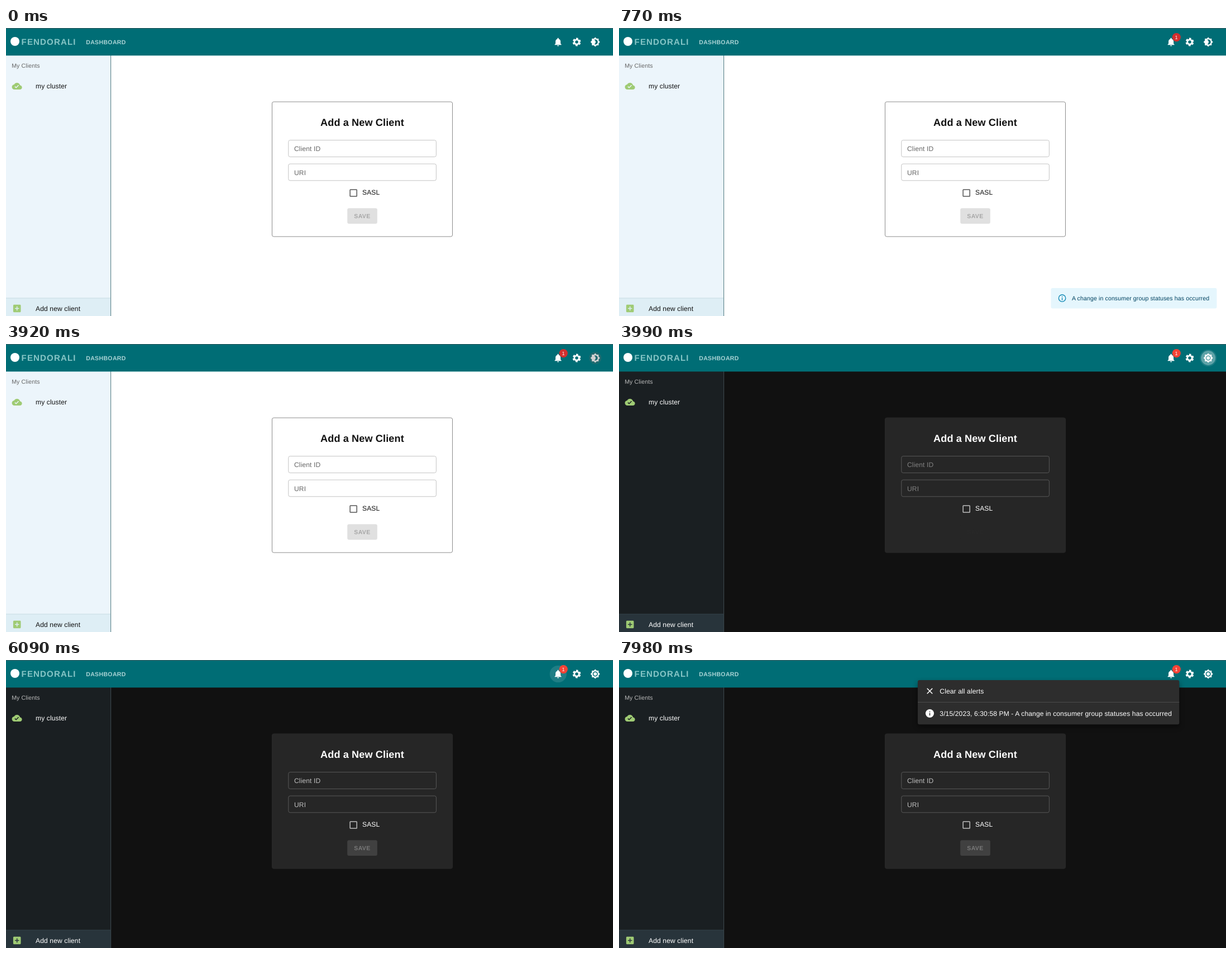
Write an HTML page that moves like this. It is 1087 by 515 pixels and loops after 8 s.

```html
<!DOCTYPE html>
<html lang="en">
<head>
<meta charset="utf-8">
<title>Client dashboard</title>
<style>
  html, body { margin: 0; width: 100%; height: 100%; overflow: hidden; }
  svg { display: block; width: 1087px; height: 515px;
    font: 12.08px "Liberation Sans", Arial, sans-serif; letter-spacing: .113px;
    text-rendering: geometricPrecision;
    --page: #fff; --drawer: #ecf5fb; --edge: #668a91; --item: #deeef5; --rule: #c9dde3;
    --card: #fff; --frame: #8c8c8c; --field: #c4c4c4; --text: #111; --soft: #666;
    --box: #555; --badge: #d32f2f; }
  svg.dark {
    --page: #111; --drawer: #1a1f22; --edge: #39454a; --item: #28343b; --rule: #35424a;
    --card: #262626; --frame: #292929; --field: #585858; --text: #fff; --soft: #bababa;
    --box: #bdbdbd; --badge: #f44336; }
  text { fill: var(--text); white-space: pre; }
  .small { font-size: 10.57px; }
  .caps { font-size: 10.57px; font-weight: bold; letter-spacing: .32px; }
  .field rect { fill: none; stroke: var(--field); }
  .field text { fill: var(--label); }
  .green { fill: #9fcb74; }
  .white { fill: #fff; }
  .line { fill: none; stroke-width: 2; }
  #menu { --text: #fff; filter: drop-shadow(0 4px 5px rgba(0, 0, 0, .45)); }
</style>
</head>
<body>
<svg id="stage" viewBox="0 0 1087 515">
  <rect width="1087" height="515" fill="var(--page)"/>

  <!-- drawer -->
  <rect y="49" width="187" height="466" fill="var(--drawer)"/>
  <rect y="483" width="187" height="32" fill="var(--item)"/>
  <rect y="482.5" width="187" height="1" fill="var(--rule)"/>
  <rect x="187" y="49" width="1.2" height="466" fill="var(--edge)"/>
  <text class="small" x="10.2" y="71.3" style="fill:var(--soft)">My Clients</text>
  <text x="53" y="108">my cluster</text>
  <text x="53" y="505.6">Add new client</text>
  <g class="green">
    <path data-at="19.6 104" d="M19.35 10.04C18.67 6.59 15.64 4 12 4 9.11 4 6.6 5.64 5.35 8.04 2.34 8.36 0 10.91 0 14c0 3.31 2.69 6 6 6h13c2.76 0 5-2.24 5-5 0-2.64-2.05-4.78-4.65-4.96zM10 17l-3.5-3.5 1.41-1.41L10 14.17 15.18 9l1.41 1.41z"/>
    <path data-at="19.7 501.5" d="M19 3H5c-1.1 0-2 .9-2 2v14c0 1.1.9 2 2 2h14c1.1 0 2-.9 2-2V5c0-1.1-.9-2-2-2zm-2 10h-4v4h-2v-4H7v-2h4V7h2v4h4z"/>
  </g>

  <!-- form -->
  <rect x="476.5" y="132" width="323" height="241" rx="3" fill="var(--card)" stroke="var(--frame)"/>
  <text x="563" y="174.6" style="font-size:18.12px;font-weight:bold;letter-spacing:.12px">Add a New Client</text>
  <g class="field">
    <rect x="505.8" y="200.6" width="264.6" height="29.8" rx="3"/>
    <text x="516" y="220.2">Client ID</text>
    <rect x="505.8" y="243" width="264.6" height="29.8" rx="3"/>
    <text x="516" y="262.5">URI</text>
  </g>
  <rect class="line" data-at="622.2 295" x="4" y="4" width="16" height="16" rx="1" stroke="var(--box)"/>
  <text x="638" y="298.3">SASL</text>
  <rect x="611.2" y="322.2" width="53.7" height="27.8" rx="3" fill="var(--save)"/>
  <text class="caps" x="623.3" y="339.8" style="fill:var(--saveText)">SAVE</text>

  <!-- top bar -->
  <rect width="1087" height="49.3" fill="#006d75"/>
  <rect width="1087" height="1" fill="#3d5d60"/>
  <circle class="white" cx="16" cy="24" r="8"/>
  <text x="27.6" y="30.4" style="fill:#86c5c6;font-size:15.1px;font-weight:bold;letter-spacing:1.1px">FENDORALI</text>
  <text class="caps" x="143.2" y="28.8" style="fill:#a9d3d5">DASHBOARD</text>
  <g class="white">
    <circle id="bellHover" cx="988.8" cy="25" r="15.1"/>
    <circle id="modeHover" cx="1055.2" cy="25" r="15.1"/>
    <path data-at="988.6 25" d="M12 22c1.1 0 2-.9 2-2h-4c0 1.1.89 2 2 2zm6-6v-5c0-3.07-1.64-5.64-4.5-6.32V4c0-.83-.67-1.5-1.5-1.5s-1.5.67-1.5 1.5v.68C7.63 5.36 6 7.92 6 11v5l-2 2v1h16v-1z"/>
    <g data-at="1022 25" fill="none" stroke="#fff">
      <circle cx="12" cy="12" r="5.5" stroke-width="3.8"/>
      <circle cx="12" cy="12" r="8.2" stroke-width="3.2" stroke-dasharray="4.8 3.787" stroke-dashoffset="-1.893"/>
    </g>
    <path id="mode" data-at="1055.2 25" fill-rule="evenodd"/>
    <circle id="bellRipple" cx="988.8" cy="25"/>
  </g>
  <circle id="modeRipple" cx="1055.2" cy="25"/>
  <g id="badge">
    <circle cx="998.3" cy="16.6" r="7.6" fill="var(--badge)"/>
    <text class="white" x="995.6" y="19.8" style="fill:#fff;font-size:9.06px">1</text>
  </g>

  <g id="snack">
    <rect x="773.5" y="465" width="297" height="36.5" rx="3" fill="#e5f6fd"/>
    <g data-at="793.6 483.2" data-size="16.6" fill="#1289b5">
      <circle class="line" cx="12" cy="12" r="9" stroke="#1289b5"/>
      <path d="M11 7h2v2h-2zM11 11h2v6h-2z"/>
    </g>
    <text class="small" x="811" y="487" style="fill:#014361">A change in consumer group statuses has occurred</text>
  </g>

  <g id="menu">
    <rect x="535" y="36" width="468.3" height="79.2" rx="3" fill="#2d2d2d"/>
    <rect x="535" y="75" width="468.3" height="1" fill="#4b4b4b"/>
    <path class="line" data-at="556.5 55.5" d="M5.7 5.7 18.3 18.3M18.3 5.7 5.7 18.3" stroke="#fff"/>
    <text x="574.3" y="59.7">Clear all alerts</text>
    <g data-at="556.5 95.5">
      <circle class="white" cx="12" cy="12" r="10"/>
      <path d="M11 7h2v2h-2zM11 11h2v6h-2z" fill="#2d2d2d"/>
    </g>
    <text x="574.3" y="99.7">3/15/2023, 6:30:58 PM - A change in consumer group statuses has occurred</text>
  </g>
</svg>
<script>
  const LOOP = 8000, STEP = 70, DARK_AT = 3990;
  const get = id => document.getElementById(id);
  const stage = get('stage');
  const burst = 'M20 8.69V4h-4.69L12 .69 8.69 4H4v4.69L.69 12 4 15.31V20h4.69L12 23.31 15.31 20H20v-4.69L23.31 12z';
  const moon = burst + 'M12 18c-.89 0-1.74-.2-2.5-.55C11.56 16.5 13 14.42 13 12s-1.44-4.5-3.5-5.45C10.26 6.2 11.11 6 12 6c3.31 0 6 2.69 6 6s-2.69 6-6 6z';
  const sun = burst + 'M18 12a6 6 0 1 1-12 0a6 6 0 1 1 12 0zM16 12a4 4 0 1 0-8 0a4 4 0 1 0 8 0z';

  // Icons are drawn on a 24-unit grid and centred at data-at.
  for (const el of document.querySelectorAll('[data-at]')) {
    const scale = (el.dataset.size || 18.12) / 24;
    el.setAttribute('transform', `translate(${el.dataset.at}) scale(${scale}) translate(-12 -12)`);
  }

  const ramp = (t, start, length) => Math.min(1, Math.max(0, (t - start) / length));
  const easeOut = x => 1 - (1 - x) ** 3;
  const smooth = x => x * x * (3 - 2 * x);

  // Blend from translucent black to translucent white.
  function blend(black, white, k) {
    const alpha = black + (white - black) * k;
    const grey = Math.round(255 * white * k / alpha);
    return `rgba(${grey},${grey},${grey},${alpha})`;
  }

  function zoom(id, x, y, sx, sy, opacity) {
    const el = get(id);
    el.setAttribute('transform', `translate(${x} ${y}) scale(${sx} ${sy}) translate(${-x} ${-y})`);
    el.setAttribute('opacity', opacity);
  }

  const grow = (id, x, y, k) => zoom(id, x, y, .75 + .25 * k, .5625 + .4375 * k, k);

  function ripple(id, t, start, release, fade) {
    get(id).setAttribute('r', 15.1 * easeOut(ramp(t, start, 550)));
    get(id).setAttribute('opacity', .3 * (1 - ramp(t, release, fade)));
  }

  function draw(t) {
    const dark = t >= DARK_AT;
    stage.classList.toggle('dark', dark);
    get('mode').setAttribute('d', dark ? sun : moon);

    const label = easeOut(ramp(t, 3930, 200)), save = smooth(ramp(t, 3930, 230));
    stage.style.setProperty('--label', blend(.6, .7, label));
    stage.style.setProperty('--save', blend(.12, .12, save));
    stage.style.setProperty('--saveText', blend(.26, .3, save));

    const arrive = easeOut(ramp(t, 500, 225));
    zoom('badge', 998.3, 16.6, arrive, arrive, 1);
    grow('snack', 922, 483, t < 3640 ? arrive : 0);

    get('modeHover').setAttribute('opacity', dark ? .1 * (1 - ramp(t, 5780, 200)) : 0);
    get('bellHover').setAttribute('opacity', .12 * (ramp(t, 5840, 200) - ramp(t, 7650, 250)));
    get('modeRipple').setAttribute('fill', dark ? '#fff' : '#666');
    ripple('modeRipple', t, 3730, 4000, 480);
    ripple('bellRipple', t, 7500, 7640, 300);

    grow('menu', 1003.3, 36, easeOut(ramp(t, 7650, 242)));
  }

  function tick(now) {
    const t = now % LOOP;
    draw(Math.floor(t / STEP) * STEP);
    requestAnimationFrame(tick);
  }
  draw(0);
  requestAnimationFrame(tick);
</script>
</body>
</html>
```
